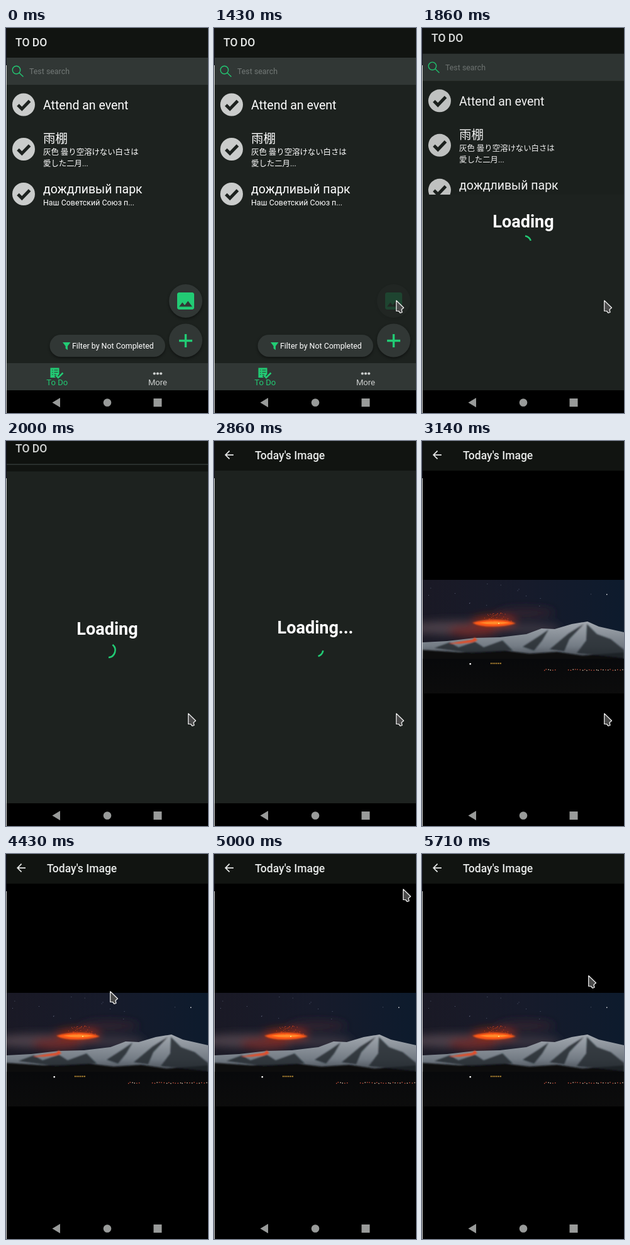
Recreate the animation shown at these times as an HTML page. Size 321 px wide and 610 px high, loop 6.01 s.

```html
<!DOCTYPE html>
<html lang="en">
<head>
<meta charset="utf-8">
<title>To do app</title>
<style>
  html, body { margin: 0; width: 100%; height: 100%; overflow: hidden; background: #000; }
  svg { display: block; width: 100%; height: 100%; }
  text { font-family: Roboto, "Noto Sans CJK JP", "Noto Sans CJK", sans-serif; fill: #fff; white-space: pre; }
  .bar { font-size: 17.5px; font-weight: 500; fill: #e6e8e7; }
  .title { font-size: 19.5px; }
  .small { font-size: 12.4px; }
  .tab { font-size: 13.1px; text-anchor: middle; }
  .loading { font-size: 27px; font-weight: 700; text-anchor: middle; }
  .header { fill: #111411; }
  .body { fill: #1d221f; }
  .panel { fill: #313735; }
  .green { fill: #22cb74; }
  .line { fill: none; stroke: #22cb74; }
  .raised { filter: drop-shadow(0 2px 2px #0007); }
</style>
</head>
<body>
<svg viewBox="0 0 321 610" preserveAspectRatio="none">
  <defs>
    <clipPath id="stage"><rect x="1" width="320" height="574"/></clipPath>
    <clipPath id="revealClip"><rect id="reveal" x="1" width="320" height="574"/></clipPath>
    <clipPath id="photoClip"><rect x="1" y="220" width="320" height="180"/></clipPath>
    <g id="check">
      <circle r="18" fill="#cacccb"/>
      <path d="M-9 .5l6.3 6.3L9.6-6" fill="none" stroke="#1d221f" stroke-width="5"/>
    </g>
    <linearGradient id="sky" x1="0" y1="0" x2="1" y2="0">
      <stop stop-color="#1a1925"/><stop offset=".5" stop-color="#171b2b"/><stop offset="1" stop-color="#0d1b2d"/>
    </linearGradient>
    <linearGradient id="snow" x1="0" y1="0" x2="0" y2="1">
      <stop stop-color="#a3a9b0"/><stop offset=".45" stop-color="#737b84"/><stop offset=".75" stop-color="#343a41"/><stop offset="1" stop-color="#0b0d0f"/>
    </linearGradient>
    <linearGradient id="ground" x1="0" y1="0" x2="0" y2="1">
      <stop stop-color="#08090b"/><stop offset="1" stop-color="#0c0c0c"/>
    </linearGradient>
    <filter id="soft" x="-50%" y="-100%" width="200%" height="300%"><feGaussianBlur stdDeviation="7"/></filter>
    <filter id="edge" x="-20%" y="-50%" width="140%" height="200%"><feGaussianBlur stdDeviation="1"/></filter>
  </defs>

  <rect width="321" height="610"/>

  <g clip-path="url(#stage)">
    <g id="list">
      <rect class="body" width="321" height="590"/>
      <rect class="header" width="321" height="47"/>
      <text class="bar" x="15" y="28.5">TO DO</text>
      <rect class="panel" y="47" width="321" height="43"/>
      <g class="line" stroke-width="1.4"><circle cx="16.5" cy="66.5" r="6.2"/><path d="M21 71l6.5 6.2"/></g>
      <text class="small" x="37" y="73" style="fill:#737977">Test search</text>

      <use href="#check" x="28" y="121.5"/>
      <use href="#check" x="28" y="192"/>
      <use href="#check" x="28" y="263"/>
      <text class="title" x="59" y="129">Attend an event</text>
      <text class="title" x="59" y="182" lang="ja">雨棚</text>
      <text class="small" x="59" y="201" lang="ja">灰色 曇り空溶けない白さは</text>
      <text class="small" x="59" y="219" lang="ja">愛した二月...</text>
      <text class="title" x="59" y="262">дождливый парк</text>
      <text class="small" x="59" y="281">Наш Советский Союз п...</text>

      <g id="imageButton">
        <circle class="panel raised" cx="285.5" cy="432.5" r="26.5"/>
        <path class="green" transform="translate(267.5 414.5) scale(1.5)" d="M21 19V5c0-1.1-.9-2-2-2H5c-1.1 0-2 .9-2 2v14c0 1.1.9 2 2 2h14c1.1 0 2-.9 2-2zM8.5 13.5l2.5 3.01L14.5 12l4.5 6H5l3.5-4.5z"/>
      </g>
      <circle class="panel raised" cx="285.5" cy="495" r="26.5"/>
      <path class="line" stroke-width="3.4" d="M275 495.5h21M285.5 485v21"/>
      <rect class="panel raised" x="69.5" y="486" width="183.5" height="35" rx="17.5"/>
      <path class="green" d="M90 498h12.5l-4.6 6v6.2l-3.3-2.4V504z"/>
      <text class="small" x="105" y="508">Filter by Not Completed</text>

      <rect class="panel" y="531" width="321" height="60"/>
      <path class="green" d="M70.5 538.5h14v10l-3 3-2-2-2.5 2.5 2 2h-8.500z"/>
      <path d="M73 542h1.500m2 0h6M73 545.500h1.500m2 0h6M73 549h1.500m2 0h3" stroke="#313735" stroke-width="1.200"/>
      <path class="line" stroke-width="2.500" d="M79.500 550.500l3.500 3.500 7.500-7.500"/>
      <text class="tab" x="81.300" y="565.500" style="fill:#22cb74">To Do</text>
      <g fill="#cbcecd"><circle cx="235.800" cy="547.500" r="2.100"/><circle cx="241" cy="547.500" r="2.100"/><circle cx="246.200" cy="547.500" r="2.100"/></g>
      <text class="tab" x="241" y="565.500" style="fill:#cbcecd">More</text>
    </g>
    <rect id="shade" width="321" height="574" opacity="0"/>
  </g>

  <g id="detail" clip-path="url(#revealClip)">
    <g id="detailBody">
      <rect id="backdrop" y="47" width="321" height="530"/>
      <rect class="header" width="321" height="47"/>
      <path fill="#e6e8e7" transform="translate(13.500 11.500) scale(.875)" d="M20 11H7.830l5.590-5.590L12 4l-8 8 8 8 1.410-1.410L7.830 13H20v-2z"/>
      <text class="bar" x="65" y="28.500">Today's Image</text>
      <g id="loader">
        <text id="loadingText" class="loading" x="161" y="305">Loading</text>
        <path id="spinner" class="line" stroke-width="2.600"/>
      </g>
      <g id="photo" clip-path="url(#photoClip)">
        <rect y="220" width="321" height="180" fill="url(#sky)"/>
        <g filter="url(#soft)">
          <ellipse cx="60" cy="296" rx="85" ry="11" fill="#4b4049"/>
          <ellipse cx="165" cy="272" rx="45" ry="7" fill="#30232e"/>
          <ellipse cx="170" cy="297" rx="50" ry="8" fill="#3b3540"/>
          <ellipse cx="80" cy="301" rx="38" ry="9" fill="#6b2a2c"/>
          <ellipse cx="114" cy="286" rx="35" ry="9" fill="#8a2a13"/>
        </g>
        <path d="M1 319l39-2 44-5 40-1 42-5 24-9 21 1 27-8 25-4 18 8 40 9v70H1z" fill="url(#snow)"/>
        <g filter="url(#edge)">
          <path d="M1 331l60 4 70-3 40 5 44-3 40 6 66-5v30H1z" fill="#0b0d10"/>
          <path d="M160 326l25-16 16-11-10 17-13 16zM203 330l30-25 24-15-23 24-8 19zM262 290l16 16 22 8 21 17v13l-75-8 15-20zM20 328l24-9 14 8 26-9 14 9 30-11 16 16-65 4z" fill="#20262d" opacity=".8"/>
          <path d="M80 288q16-5 36-5 20 0 33 6-16 5-37 5-22 0-32-6z" fill="#ff5a17"/>
          <path d="M42 321l18-3 20-3 4-4 4 5-10 3-18 2z" fill="#e94a22"/>
        </g>
        <path d="M91 288q25-4 48 0-24 5-48 0z" fill="#ff8a2a"/>
        <rect y="345" width="321" height="55" fill="url(#ground)"/>
        <g id="sparks"></g>
      </g>
    </g>
  </g>

  <g fill="#999b9a">
    <path d="M73.500 593.500l12.500-7.500v15z"/>
    <circle cx="161" cy="593.500" r="6.300"/>
    <rect x="234.500" y="587" width="13" height="13"/>
  </g>
  <rect width="1" height="59" fill="#11121f"/>
  <rect y="59" width="1" height="551" fill="#dfe0e0"/>
  <path id="cursor" d="M.7.800V17.500H4.500L7 20.500 10 19.500 9 15 12.500 12.300z" fill="#4a4a4a" stroke="#f4f4f4" stroke-width="1.200" stroke-linejoin="round"/>
</svg>

<script>
const LOOP = 6010, RATE = 7, SCREEN = 574;
const el = id => document.getElementById(id);
const show = (id, on) => el(id).setAttribute('display', on ? 'inline' : 'none');
const shift = (id, x, y) => el(id).setAttribute('transform', `translate(${x} ${y})`);

// Each row: first tick, then its values.
const cursorSteps = [
  [0, 340, 440], [2, 314, 428], [3, 300, 426], [4, 290, 427], [5, 287, 430], [6, 289, 431],
  [28, 278, 405], [29, 246, 345], [30, 205, 280], [31, 165, 217], [32, 90, 105],
  [33, 37, 11], [34, 165, 25], [35, 300, 55],
  [36, 307, 200], [37, 205, 342], [38, 87, 240], [39, 165, 130], [40, 264, 192]
];
const buttonSteps = [[0, 1], [9, .5], [10, .2]];
const revealSteps = [[0, 0], [13, .54], [14, .934], [15, .998], [16, 1]];
const spinSteps = [
  [13, -80, 60], [14, -50, 135], [15, -10, 220], [16, 30, 268],
  [17, 80, 270], [18, 160, 235], [19, 275, 150], [20, 370, 62]
];
const photoSteps = [[0, 0], [21, .65], [22, 1]];
const at = (steps, tick) => (steps.findLast(s => s[0] <= tick) || steps[0]).slice(1);

function arc(cx, cy, r, start, sweep) {
  const point = deg => {
    const a = deg * Math.PI / 180;
    return `${cx + r * Math.cos(a)} ${cy + r * Math.sin(a)}`;
  };
  return `M${point(start)}A${r} ${r} 0 ${sweep > 180 ? 1 : 0} 1 ${point(start + sweep)}`;
}

function addSparks() {
  let seed = 11;
  const random = () => (seed = seed * 16807 % 2147483647) / 2147483647;
  const dot = (x, y, size, color) =>
    `<rect x="${x}" y="${y}" width="${size}" height="${size}" fill="${color}"/>`;
  let dots = '';
  for (let i = 0; i < 14; i++) dots += dot(10 + random() * 300, 224 + random() * 45, .8, '#77809a');
  for (let i = 0; i < 45; i++) {
    const rise = random() ** 2 * 13;
    dots += dot(118 + (random() - .5) * (50 - rise * 2), 285 - rise, .9, '#e8481b');
  }
  for (let x = 194; x < 320; x += 2.6 + random() * 2) {
    if (x < 213 || x > 229) dots += dot(x, 361 + random() * 2, 1.4, random() < .6 ? '#d5573f' : '#e8c9b0');
  }
  for (let x = 109; x < 126; x += 3) dots += dot(x, 351.5, 1.8, '#e0a83c');
  dots += dot(75.5, 352, 2.4, '#fff') + dot(293, 242.5, 1.4, '#fff') + dot(121, 288, 2, '#ffd46a');
  el('sparks').innerHTML = dots;
}

function draw(time) {
  const tick = Math.floor((time % LOOP + 5) * RATE / 1000);
  const [reveal] = at(revealSteps, tick);
  const loading = tick < 21;
  const [opacity] = at(photoSteps, tick);

  shift('cursor', ...at(cursorSteps, tick));
  el('imageButton').setAttribute('opacity', at(buttonSteps, tick)[0]);
  shift('list', 0, -SCREEN * .02 * reveal);
  el('shade').setAttribute('opacity', .1 * reveal);

  show('detail', reveal > 0);
  el('reveal').setAttribute('y', SCREEN * (1 - reveal));
  el('reveal').setAttribute('height', SCREEN * reveal);
  shift('detailBody', 0, SCREEN * .041 * (1 - reveal));
  el('backdrop').setAttribute('fill', loading ? '#1d221f' : '#000');

  show('loader', loading);
  el('loadingText').textContent = 'Loading' + '.'.repeat(Math.max(0, Math.min(3, Math.floor((tick - 13) / 2))));
  el('spinner').setAttribute('d', arc(162, 330, 11.5, ...at(spinSteps, tick)));
  show('photo', opacity > 0);
  el('photo').setAttribute('opacity', opacity);
}

addSparks();
const start = performance.now();
function frame() {
  draw(performance.now() - start);
  requestAnimationFrame(frame);
}
frame();
</script>
</body>
</html>
```
